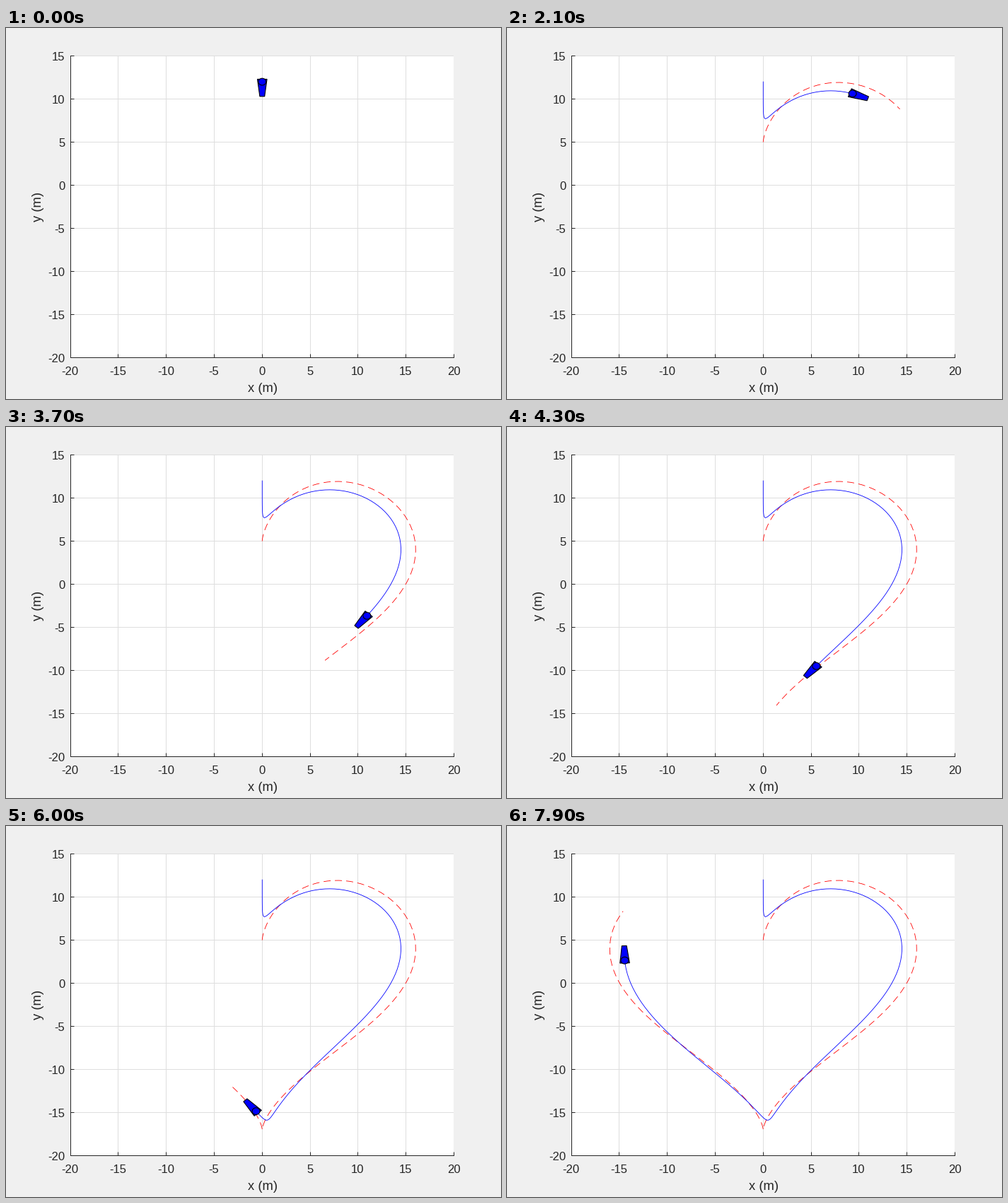
Write a matplotlib script that moves like this. It is 700 px wide and 525 px high and loops after 8 s.

```python
import numpy as np
import matplotlib.pyplot as plt
from matplotlib.animation import FuncAnimation
from matplotlib.patches import Circle, Polygon
from matplotlib.transforms import ScaledTranslation

W, H, DPI = 700, 525, 100
FRAMES, INTERVAL = 80, 100
LEFT, RIGHT, TOP, BOTTOM = 90.55, 633.05, 39, 466
INK = '#262626'
PX = 72 / DPI  # points per pixel


def heart(t):
    x = 16 * np.sin(t) ** 3
    y = 13 * np.cos(t) - 5 * np.cos(2 * t) - 2 * np.cos(3 * t) - np.cos(4 * t)
    return np.column_stack([x, y])


def follow(goal, start, gain):
    """Proportional pursuit: each step closes a fixed share of the gap."""
    pos = np.empty_like(goal)
    pos[0] = start
    for i in range(len(goal) - 1):
        pos[i + 1] = pos[i] + gain * (goal[i] - pos[i])
    return pos


goal = heart(np.linspace(0, 2 * np.pi, 200))
pos = follow(goal, (0, 12), 0.1)
step = np.diff(pos, axis=0)
heading = np.arctan2(step[:, 1], step[:, 0])

# Robot outline around its centre, nose towards +x
BODY = np.array([(-1, -0.5), (1, -0.25), (1, 0.25), (-1, 0.5)])
HUB = np.array([-0.7, 0])


def place(shape, angle, centre):
    c, s = np.cos(angle), np.sin(angle)
    return shape @ np.array([[c, s], [-s, c]]) + centre


plt.rcParams['font.family'] = 'Liberation Sans'
fig = plt.figure(figsize=(W / DPI, H / DPI), dpi=DPI, facecolor='#f0f0f0')
ax = fig.add_axes([LEFT / W, 1 - BOTTOM / H,
                   (RIGHT - LEFT) / W, (BOTTOM - TOP) / H])
ax.set(xlim=(-20, 20), ylim=(-20, 15),
       xticks=range(-20, 21, 5), yticks=range(-20, 16, 5))
ax.set_axisbelow(True)
ax.grid(color='#dedede', lw=PX)
ax.tick_params(direction='in', length=5 * PX, width=PX, color=INK,
               labelbottom=False, labelleft=False)
for side, spine in ax.spines.items():
    spine.set(visible=side in ('left', 'bottom'), color=INK, linewidth=PX)


def label(x, y, text, size=16.67, ha='center', rotation=0):
    fig.text(x / W, 1 - y / H, text, size=size * PX, color=INK, ha=ha,
             va='baseline', rotation=rotation, rotation_mode='anchor')


for v in range(-20, 21, 5):
    label(LEFT + (v + 20) * (RIGHT - LEFT) / 40, 491, str(v))
for v in range(-20, 16, 5):
    label(83.4, BOTTOM - (v + 20) * (BOTTOM - TOP) / 35 + 7, str(v), ha='right')
label(363, 515, 'x (m)', 18.33)
label(50, 253, 'y (m)', 18.33, rotation=90)

# Grid lines sit on pixel centres, so the data moves half a pixel to meet them
data = ax.transData + ScaledTranslation(0.5 / DPI, -0.5 / DPI,
                                        fig.dpi_scale_trans)
LW = 0.6
dash = (0, (10 * PX / LW, 6 * PX / LW))
goal_line, = ax.plot([], [], color='red', lw=LW, ls=dash, zorder=3,
                     transform=data)
path_line, = ax.plot([], [], color='blue', lw=LW, zorder=4, transform=data)
style = dict(fc='blue', ec='black', lw=1.1 * PX, transform=data)
body = ax.add_patch(Polygon(BODY, zorder=5, **style))
hub = ax.add_patch(Circle((0, 0), 0.4, zorder=6, **style))
ax.set(xlim=(-20, 20), ylim=(-20, 15))


def draw(n):
    i = max(2 * n - 1, 0)
    goal_line.set_data(*goal[:i + 1].T)
    path_line.set_data(*pos[:i + 2].T)
    body.set_xy(place(BODY, heading[i], pos[i + 1]))
    hub.center = place(HUB, heading[i], pos[i + 1])
    return goal_line, path_line, body, hub


anim = FuncAnimation(fig, draw, frames=FRAMES, interval=INTERVAL,
                     init_func=lambda: draw(0), repeat=True, repeat_delay=0)
plt.show()
```
